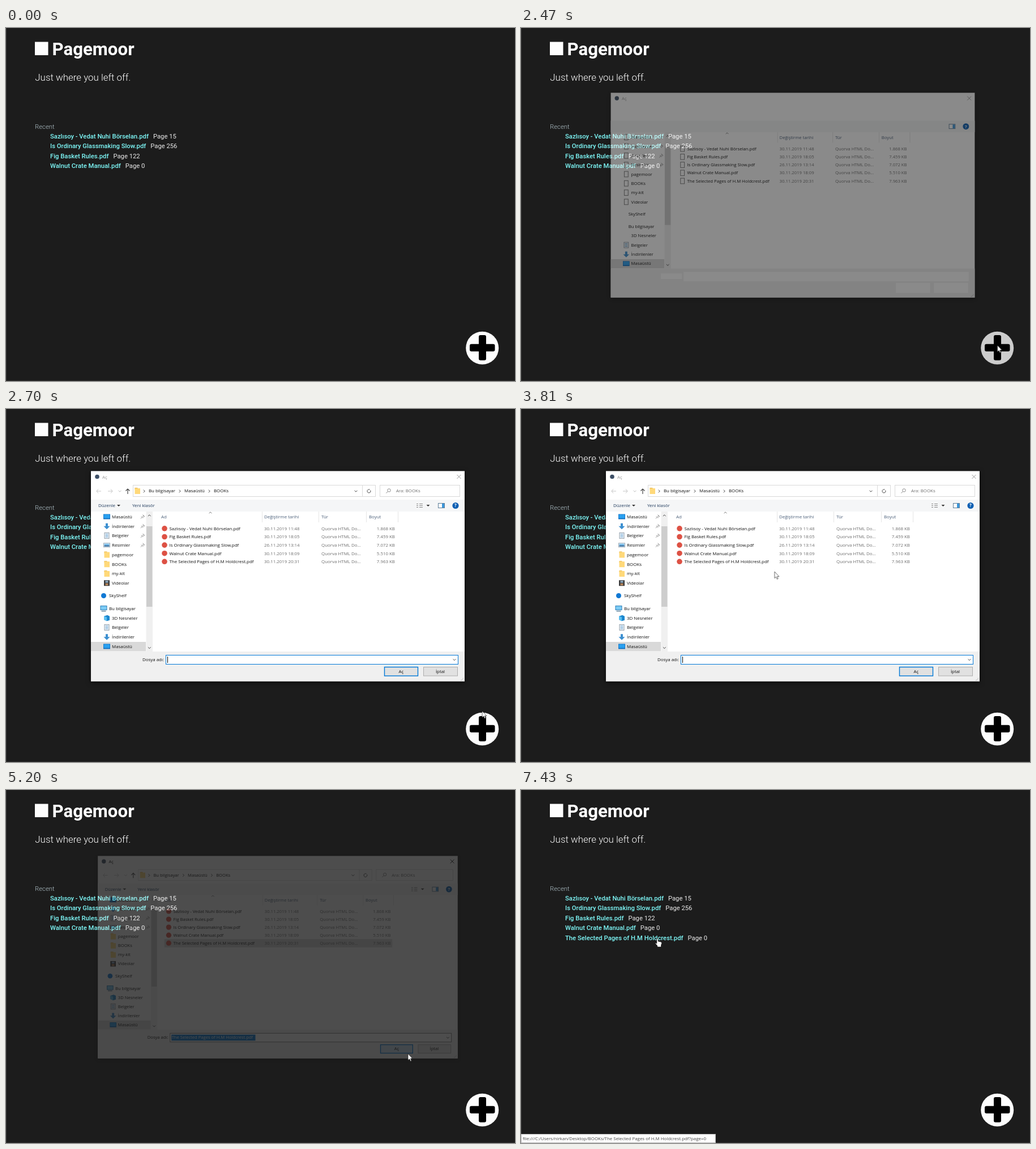
An HTML page that plays this animation: 899 by 623 pixels, repeating every 8000 ms.

```html
<!DOCTYPE html>
<html lang="tr">
<head>
<meta charset="utf-8">
<title>Pagemoor</title>
<style>
html, body { margin: 0; width: 100%; height: 100%; overflow: hidden; background: #1c1c1c; }
svg { display: block; width: 100%; height: 100%; }
text { white-space: pre; }
.page { font: 500 11.25px Roboto, sans-serif; }
.heading { font-size: 31.2px; font-weight: 700; }
.tagline { font-size: 16.9px; font-weight: 300; }
.recent { font-size: 11.36px; font-weight: 300; }
.pageno { font-weight: 400; }
.ui { font: 7.92px "Open Sans", sans-serif; }

.anim { animation: 8s step-end infinite; }
#dialog { transform-origin: 479.5px 294.7px; animation-name: dialog; filter: drop-shadow(0 2px 4px #0009); }
#early { animation-name: early; }
.late { animation-name: late; }
#title { animation-name: activate; }
#field { animation-name: blur; }
#caret { animation-name: caret; }
#row { animation-name: row; }
#name { animation-name: name; }
#marked { animation-name: marked; }
#open { animation-name: open; }
#added { animation-name: added; }
#status { animation-name: status; }
#arrow { animation-name: arrow; }
#hand { animation-name: hand; }
#disc { animation: disc 8s linear infinite; }
#cursor { animation: move 8s linear infinite; }

@keyframes dialog {
  0% { opacity: 0; transform: scale(.974); }
  30.875% { opacity: .49; transform: scale(.974); }
  32% { opacity: .88; transform: scale(.994); }
  32.875% { opacity: 1; transform: none; }
  64% { opacity: .6; transform: scale(.985); }
  65% { opacity: .22; transform: scale(.963); }
  65.875%, 100% { opacity: 0; transform: scale(.963); }
}
@keyframes early { 0% { visibility: visible; } 32%, 100% { visibility: hidden; } }
@keyframes late { 0% { visibility: hidden; } 32%, 100% { visibility: visible; } }
@keyframes activate { 0% { color: #999; } 52.5%, 100% { color: #111; } }
@keyframes blur { 0% { stroke: #0078d7; } 52.5%, 100% { stroke: #7a7a7a; } }
@keyframes caret {
  0% { visibility: hidden; } 32.875% { visibility: visible; }
  41% { visibility: hidden; } 47.6% { visibility: visible; }
  52.5%, 100% { visibility: hidden; }
}
@keyframes row {
  0% { fill: #fff; stroke: #fff; }
  49.2% { fill: #e5f3ff; stroke: #e5f3ff; }
  52.5% { fill: #cce8ff; stroke: #99d1ff; }
  64%, 100% { fill: #d9d9d9; stroke: #d9d9d9; }
}
@keyframes name { 0% { visibility: hidden; } 52.5% { visibility: visible; fill: #000; } 64%, 100% { visibility: visible; fill: #fff; } }
@keyframes marked { 0% { visibility: hidden; } 64%, 100% { visibility: visible; } }
@keyframes open { 0% { fill: #e1e1e1; } 58.6% { fill: #e5f1fb; } 62%, 100% { fill: #cce4f7; } }
@keyframes added { 0% { visibility: hidden; } 68.75%, 100% { visibility: visible; } }
@keyframes status { 0% { visibility: hidden; } 91.8%, 100% { visibility: visible; } }
@keyframes arrow { 0% { visibility: hidden; } 2.625% { visibility: visible; } 91%, 100% { visibility: hidden; } }
@keyframes hand { 0% { visibility: hidden; } 91%, 100% { visibility: visible; } }
@keyframes disc { 0%, 8.5% { fill: #fdfdfd; } 11%, 32% { fill: #ccc; } 33.75%, 100% { fill: #fdfdfd; } }
@keyframes move {
  0%, 2.625% { transform: translate(754px, 597px); animation-timing-function: ease-out; }
  12.25%, 32% { transform: translate(841.5px, 560px); }
  33.75% { transform: translate(841px, 533px); animation-timing-function: ease-in-out; }
  40%, 41% { transform: translate(537px, 330px); }
  43.9%, 45.75% { transform: translate(500px, 309px); animation-timing-function: ease-out; }
  51%, 56.25% { transform: translate(400px, 267px); animation-timing-function: ease-in-out; }
  59.1%, 61% { transform: translate(708.5px, 463px); }
  62%, 82.4% { transform: translate(710px, 465.5px); }
  83.25% { transform: translate(595px, 442px); animation-timing-function: ease-out; }
  92.8%, 100% { transform: translate(241px, 262px); }
}
</style>
</head>
<body>
<svg id="stage" viewBox="0 0 899 623"></svg>
<script>
const books = {
  saz: 'Sazlısoy - Vedat Nuhi Börselan.pdf',
  glass: 'Is Ordinary Glassmaking Slow.pdf',
  fig: 'Fig Basket Rules.pdf',
  walnut: 'Walnut Crate Manual.pdf',
  pages: 'The Selected Pages of H.M Holdcrest.pdf',
};

const rect = (x, y, w, h, fill, extra = '') =>
  `<rect x="${x}" y="${y}" width="${w}" height="${h}" fill="${fill}" ${extra}/>`;
const box = (x, y, w, h, fill, stroke, extra = '') =>
  rect(x + .5, y + .5, w - 1, h - 1, fill, `stroke="${stroke}" ${extra}`);
const line = (d, stroke, width = 1) =>
  `<path d="${d}" fill="none" stroke="${stroke}" stroke-width="${width}"/>`;
const label = (x, y, text, fill = '#111', extra = '') =>
  `<text x="${x}" y="${y + 2.8}" fill="${fill}" ${extra}>${text}</text>`;
const late = content => `<g class="anim late">${content}</g>`;
const chevron = (x, y, turn = 0, color = '#444') =>
  `<g transform="translate(${x} ${y}) rotate(${turn})">${line('M-2.4-1.2L0 1.2 2.4-1.2', color)}</g>`;
const at = (x, y, content) => `<g transform="translate(${x} ${y})">${content}</g>`;

// Small icons, drawn around their centre
const icons = {
  desktop: rect(-6, -4.5, 12, 9, '#0f6cbd') + rect(-5.3, -3.8, 10.6, 6.6, '#29a0f0'),
  download: '<path d="M-2-5H2V0H5.5L0 5.5-5.5 0H-2Z" fill="#3c8fd0"/>',
  sheet: box(-4.5, -5.5, 9, 11, '#fff', '#8a99a8') + line('M-2.5-2.5H2.5M-2.5 0H2.5M-2.5 2.5H2.5', '#4a90c8'),
  picture: box(-6, -4, 12, 8, '#fff', '#99a8b4') + rect(-4.5, -2.5, 9, 2.5, '#7fc4f0') + rect(-4.5, 0, 9, 2.5, '#3a76a8'),
  folder: rect(-4.5, -5.5, 5, 3, '#e8b64c') + rect(-4.5, -4.5, 9.5, 10, '#ffd97a'),
  video: rect(-5, -5, 10, 10, '#3b3b3b') + rect(-2.5, -4, 5, 3.4, '#8aa6bd') + rect(-2.5, .6, 5, 3.4, '#b9865a'),
  storage: '<circle r="4.5" fill="#0f78d4"/>',
  computer: rect(-6, -5, 12, 8, '#2c7fb8') + rect(-5, -4, 10, 6, '#7ccbf5') + rect(-4, 4, 8, 1.4, '#5b7f99'),
  cube: '<path d="M-5-3L1-5 5-3V4L0 5.5-5 3Z" fill="#1b87cf"/><path d="M-5-3L0-1.5V5.5L-5 3Z" fill="#5bc0f2"/>',
  blank: box(-4, -5.5, 8, 11, '#fff', '#777'),
};

const sideItems = [
  ['Masaüstü', 'desktop', 190], ['İndirilenler', 'download', 206.7], ['Belgeler', 'sheet', 223.4],
  ['Resimler', 'picture', 240.2], ['pagemoor', 'folder', 257], ['BOOKs', 'folder', 273.7],
  ['my-kit', 'folder', 290.5], ['Videolar', 'video', 307.2], ['SkyShelf', 'storage', 329.5],
  ['Bu bilgisayar', 'computer', 352], ['3D Nesneler', 'cube', 368.7], ['Belgeler', 'sheet', 385.4],
  ['İndirilenler', 'download', 402.2], ['Masaüstü', 'desktop', 419],
];
const files = [
  [books.saz, '30.11.2019 11:48', '1.868 KB'], [books.fig, '30.11.2019 18:05', '7.459 KB'],
  [books.glass, '26.11.2019 13:14', '7.072 KB'], [books.walnut, '30.11.2019 18:09', '5.510 KB'],
  [books.pages, '30.11.2019 20:31', '7.963 KB'],
];
const rowY = i => 210.9 + i * 14.6;

function page() {
  const entry = (name, pageNo, i) =>
    `<text x="78" y="${194.8 + i * 17.45}" fill="#7ffafa" ${i === 4 ? 'id="added" class="anim"' : ''}>` +
    `${name}<tspan class="pageno" dx="8" fill="#ececec">Page ${pageNo}</tspan></text>`;
  const recent = [[books.saz, 15], [books.glass, 256], [books.fig, 122], [books.walnut, 0], [books.pages, 0]];
  return rect(0, 0, 899, 623, '#1c1c1c') + rect(0, 0, 1, 623, '#333') + rect(0, 622, 899, 1, '#2c2c2c') +
    `<g class="page">${rect(51, 24.5, 23.5, 23.5, '#fdfdfd')}
      <text class="heading" x="81.5" y="48" fill="#fff">Pagemoor</text>
      <text class="tagline" x="51.3" y="93" fill="#fff">Just where you left off.</text>
      <text class="recent" x="51" y="177.6" fill="#b4c6cd">Recent</text>
      ${recent.map(([name, no], i) => entry(name, no, i)).join('')}</g>
    <circle id="disc" cx="841.2" cy="564.8" r="29"/>
    ${rect(835, 542, 13, 44.5, '#000', 'rx="3"')}${rect(819, 557.7, 44.5, 13, '#000', 'rx="3"')}`;
}

function toolbar() {
  const crumbs = [[252, 'Bu bilgisayar'], [315, 'Masaüstü'], [367, 'BOOKs']];
  return rect(150, 160, 660, 21, '#f5f6f7') +
    '<circle cx="161" cy="119.5" r="3.8" fill="#3d4f66"/>' +
    `<g id="title" class="anim">${label(170, 120, 'Aç', 'currentColor')}
      ${line('M796.5 116L803.5 123M803.5 116L796.5 123', 'currentColor')}</g>` +
    late(line('M168 145H160M163 141.5L159.8 145 163 148.5M180 145H188M185 141.5L188.2 145 185 148.5', '#c4c4c4') +
      chevron(201, 145, 0, '#bbb') + line('M215 150V141M211.5 144.5L215 141 218.5 144.5', '#444', 1.2) +
      box(224, 134, 429, 21, '#fff', '#d9d9d9') + line('M629.5 134V155', '#d9d9d9') +
      at(232, 144.5, icons.folder) +
      crumbs.map(([x, text]) => chevron(x - 8, 145, -90) + label(x, 144.5, text)).join('') +
      chevron(618, 145) + line('M643.6 143.5A3 3 0 1 1 640.5 142L642.5 142', '#444') +
      box(660, 134, 142, 21, '#fff', '#d9d9d9') +
      '<circle cx="676.5" cy="143.5" r="2.7" fill="none" stroke="#888"/>' + line('M674.5 145.5L671.5 148.5', '#888') +
      label(689, 144.5, 'Ara: BOOKs', '#6d6d6d') +
      label(163, 170.5, 'Düzenle', '#1e395b') + '<path d="M196 169H202L199 172Z" fill="#333"/>' +
      label(223, 170.5, 'Yeni klasör', '#1e395b') +
      line('M725 167.5H728M725 170.5H728M725 173.5H728M730 167.5H736M730 170.5H736M730 173.5H736', '#888') +
      '<path d="M742.5 169H748.5L745.5 172Z" fill="#333"/>') +
    box(763, 166, 12, 9, '#fff', '#5f7f99') + rect(770, 167, 4, 7, '#3b97dc') +
    '<circle cx="794" cy="170.5" r="5.6" fill="#0c5fb3"/>' +
    label(794, 170.6, '?', '#fff', 'text-anchor="middle" font-weight="700"');
}

function sidebar() {
  const pin = y => at(241.5, y, line('M-3.5 3.5L-1 1M-2.5-.5L.5 2.5M-1 .5L1.5-2M1 1.5L3-1M0-3.5L3.5 0', '#8a8a8a', .9));
  const item = ([text, icon, y], i) => {
    const root = i === 8 || i === 9;
    const image = at(root ? 172.5 : 178, y, icons[icon]);
    return (i > 10 ? image : late(image)) + label(root ? 182 : 187, y, text) + (i < 4 ? pin(y) : '');
  };
  return rect(150, 411, 97, 16.5, '#d9d9d9') + sideItems.map(item).join('') +
    rect(247.5, 181, 11.5, 247, '#f0f0f0') + rect(248, 207, 10.5, 142, '#cdcdcd') +
    chevron(253.3, 188, 180) + chevron(253.3, 421.5);
}

function fileList() {
  const columns = [[456, 'Değiştirme tarihi'], [557, 'Tür'], [641, 'Boyut']];
  const file = ([name, date, size], i) => {
    const y = rowY(i);
    return late(`<circle cx="280" cy="${y}" r="4.8" fill="#dd5144"/>`) + label(288.5, y, name) +
      label(456, y, date, '#6d6d6d') + label(557, y, 'Quorva HTML Do...', '#6d6d6d') +
      label(687, y, size, '#6d6d6d', 'text-anchor="end"');
  };
  return late(label(274, 190.5, 'Ad', '#4c607a')) +
    columns.map(([x, text]) => label(x, 190.5, text, '#4c607a')).join('') +
    line('M452.5 181V200M552.5 181V200M636.5 181V200M692.5 181V200', '#e5e5e5') + chevron(361, 183, 180, '#777') +
    box(272, 262, 418, 15, '', '', 'id="row" class="anim"') +
    files.map(file).join('');
}

function footer() {
  return rect(150, 428, 660, 52.5, '#f0f0f0') +
    late(label(279, 442, 'Dosya adı:', '#111', 'text-anchor="end"') +
      box(282, 434, 517, 17, '#fff', '', 'id="field" class="anim"') + chevron(792, 442.5) +
      box(668, 455, 60, 16.5, '', '#0078d7', 'id="open" class="anim" stroke-width="1.4"') +
      label(698, 463, 'Aç', '#111', 'text-anchor="middle"') +
      box(737, 455, 61, 16.5, '#e1e1e1', '#adadad') + label(767, 463, 'İptal', '#111', 'text-anchor="middle"')) +
    rect(285, 437, 154, 11, '#0078d7', 'id="marked" class="anim"') +
    label(285.5, 442, books.pages, '#000', 'id="name" class="anim"') +
    rect(285, 437, 1, 11, '#000', 'id="caret" class="anim"') +
    '<path d="M803 479H805V477H807V475H809" fill="none" stroke="#bbb" stroke-dasharray="1.5 1"/>';
}

function placeholders() {
  return '<g id="early" class="anim">' +
    sideItems.slice(0, 8).map(item => at(178, item[2], icons.blank)).join('') +
    files.map((_, i) => at(280, rowY(i), icons.blank)).join('') +
    rect(241, 437, 38, 10, '#fff') + rect(282, 434, 517, 17, '#fff') +
    rect(667, 454, 62, 18, '#fff') + rect(736, 454, 62, 18, '#fff') + '</g>';
}

function overlay() {
  const address = `file:///C:/Users/nirkan/Desktop/BOOKs/${books.pages}?page=0`;
  return `<g id="status" class="anim ui">${box(0, 607, 344, 16, '#fff', '#b4b4b4')}${label(3, 615, address, '#444')}</g>
    <g id="cursor" stroke="#000" stroke-width=".6" fill="#fff" stroke-linejoin="round">
      <path id="arrow" class="anim" d="M0 0V11.5L2.6 9.2 4.4 13.2 6.2 12.4 4.5 8.6H8Z"/>
      <path id="hand" class="anim" d="M-1.2 1Q0-.8 1.2 1V5L6 6Q7.8 6.4 7.6 8.5L6.5 12V15H-.2V13L-3.8 8.8Q-3.5 7-1.2 9Z"/>
    </g>`;
}

document.getElementById('stage').innerHTML = page() +
  `<g id="dialog" class="anim ui">${rect(150, 109.5, 660, 371, '#fff')}` +
  toolbar() + sidebar() + fileList() + footer() + placeholders() + '</g>' + overlay();
</script>
</body>
</html>
```
